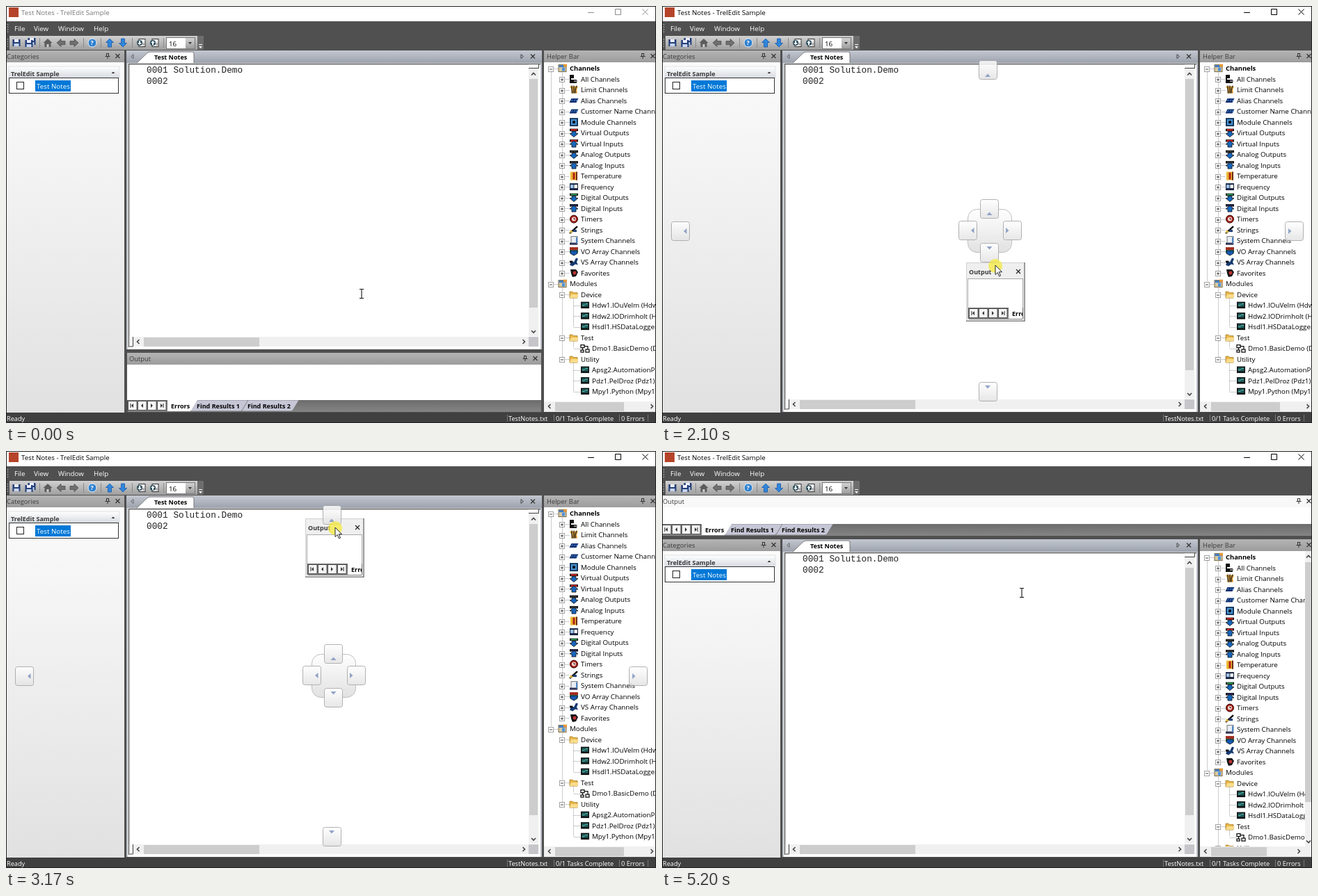
These frames come from a looping animation (934 px wide and 600 px high, 5460 ms). An HTML page:

```html
<!DOCTYPE html>
<html lang="en">
<head>
<meta charset="utf-8">
<title>Docking a panel</title>
<style>
html, body { margin: 0; width: 100%; height: 100%; overflow: hidden; background: #fff; }
#stage { display: block; font: 9.8px "Open Sans", "Noto Sans", sans-serif; }
text { white-space: pre; fill: #000; }
.b { font-size: 9px; font-weight: 700; }
.root { font-size: 9.4px; font-weight: 700; }
.soft { fill: #3a3a3a; }
.h { font-size: 9.4px; fill: #3c3c3c; }
.w { fill: #fff; }
.s { font-size: 9.2px; fill: #fff; }
.code { font: 12.8px "Liberation Mono", monospace; fill: #222; }
#title { fill: #777; }
#winbtn { stroke: #8c8c8c; }
.active #title { fill: #000; }
.active #winbtn { stroke: #000; }
#cap { fill: url(#gCap); }
.active #cap { fill: #f8f8f8; }
</style>
</head>
<body>
<svg id="stage" width="934" height="600" viewBox="0 0 934 600"></svg>
<script>
const stage = document.getElementById('stage');

// Drawing helpers
const R = (x, y, w, h, fill, more = '') => `<rect x="${x}" y="${y}" width="${w}" height="${h}" fill="${fill}" ${more}/>`;
const P = (d, fill, more = '') => `<path d="${d}" fill="${fill}" ${more}/>`;
const L = (d, color, w = 1, more = '') => `<path d="${d}" fill="none" stroke="${color}" stroke-width="${w}" ${more}/>`;
const T = (x, y, s, cls = '') => `<text x="${x}" y="${y}" class="${cls}">${s}</text>`;
const G = (x, y, body) => `<g transform="translate(${x} ${y})">${body}</g>`;
const clip = (x, y, w, h, body, vx = 0, vy = 0) =>
  `<svg x="${x}" y="${y}" width="${w}" height="${h}" viewBox="${vx} ${vy} ${w} ${h}">${body}</svg>`;
const turn = (x, y, dir, body) => `<g transform="translate(${x} ${y}) rotate(${dir * 90})">${body}</g>`;
const chev = (x, y, dir) => turn(x, y, dir, L('M-3 1.5L0-1.5 3 1.5', '#444', 1.6));
const tri = (x, y, dir) => turn(x, y, dir, P('M-4 2L0-2.5 4 2z', '#7d93bd'));
const cross = (x, y, r = 3, c = '#333') => L(`M${x - r} ${y - r}l${2 * r} ${2 * r}m0-${2 * r}l-${2 * r} ${2 * r}`, c, 1.2);
const pin = (x, y) => G(x, y, L('M-2-3.5h4m-3.5 0v4m3 0v-4m-5 4h7m-3.5 0v3.5', '#333'));
const grad = (id, a, b) => `<linearGradient id="${id}" x2="0" y2="1"><stop stop-color="${a}"/><stop offset="1" stop-color="${b}"/></linearGradient>`;

const defs = '<defs>' + grad('gCap', '#b4b4b4', '#9c9c9c') + grad('gStrip', '#c3c7d0', '#9ca2ad') +
  grad('gBar', '#d2d2d2', '#9e9e9e') + grad('gSide', '#fbfbfb', '#e1e1e1') + grad('gGroup', '#fff', '#d5d9df') +
  grad('gRow', '#6c6c6c', '#858585') + grad('gBtn', '#fff', '#e2e2e2') + grad('gHub', '#fff', '#dcdcdc') + '</defs>';

// Tree icons, centred on 0,0
const edge = 'stroke="#111" stroke-width=".8"';
const arrow = (c, up) => R(-6, -6, 12, 3.5, '#111') + R(-4.5, -5.3, 9, 2, c) +
  P(up ? 'M0-4l6 5h-3v4h-6v-4h-3z' : 'M-3-2h6v3h3L0 6l-6-5h3z', '#1766bd', edge);
const slab = P('M-6.5 3l3-6h10l-3 6z', '#0d2a6b') + L('M-3.5 1l2-3M0 1l2-3M3 1l2-3', '#4f9ae6');
const icons = {
  root: R(-6, -5, 11, 10, '#d9c9a0', 'stroke="#7b6a46"') + R(-5.5, -4.5, 10, 3, '#3d7cc6') + R(-1, -1, 4, 5, '#4f93dc') + P('M1-6h5v4h-5z', '#e59a3c'),
  all: P('M-6-6h6v5h-4v2h8v5h-10z', '#111') + R(0, 2, 5, 2, '#888'),
  limit: P('M-6-5h12l-2 5 1 5h-9l1-5z', '#dc9a28') + L('M-3-6v6l1 5M0-6v11M4-6l-2 6v5', '#222', 1.3),
  slab,
  module: R(-6, -6, 12, 12, '#123760') + R(-4, -4, 8, 8, '#4b97d4') + R(-2, -2, 4, 4, '#112'),
  vo: arrow('#d22', 0), vi: arrow('#d22', 1), ao: arrow('#333', 0), ai: arrow('#333', 1),
  dout: arrow('#2a9a50', 0), din: arrow('#225', 1),
  temp: R(-5, -6, 10, 12, '#e9b92f') + R(-1.5, -5, 3, 10, '#b3201a') + R(3, -6, 2, 12, '#6b2a10'),
  freq: R(-6, -5, 12, 10, '#17233f') + R(-5, -3, 4.5, 5, '#9cc4ee') + R(.5, -3, 4.5, 5, '#fff'),
  timer: '<circle r="5.5" fill="#a3201a" stroke="#300"/><circle r="3" fill="#f5dcd6"/>' + L('M0-2v2h2', '#300'),
  string: L('M-6 5L5-5', '#111', 2.5) + P('M-6 5l1-5 4 3z', '#e3b93a') + R(-1, 0, 5, 3, '#1c3c78'),
  system: R(-4, -6, 9, 11, '#e8eef5', 'stroke="#777"') + R(-6, 3, 11, 3, '#335') + R(3, -5, 2, 9, '#4e84c4'),
  voa: R(-6, -6, 12, 4, '#a32b20') + R(-6, -2, 12, 4, '#257a46') + P('M-5-1h10v4L0 6l-5-3z', '#1558b0', edge),
  vsa: P('M-6 4l3-6 3 2 3-6 3 1-2 5 2 4-4-1-4 3z', '#163a70') + R(-6, -2, 4, 3, '#111'),
  fav: P('M-5-5h8l3 4-3 6-5 1-2-5z', '#151515') + '<circle cx="1" r="2.5" fill="#b33"/>',
  folder: P('M-6-4h4l1.5 1.5H5V5H-6z', '#e9b84a', 'stroke="#a67a24" stroke-width=".8"') + P('M-4 0H6.5L5 5h-11z', '#f9dc8c'),
  device: R(-6, -5, 12, 9.5, '#111') + R(-4.5, -3.5, 9, 5.5, '#1f5a5c') + L('M-4 0h3l2-2h3', '#5fc2a8'),
  flow: L('M-6-5h5v4h-5zM1 1.5h5v4H1zM-6 2.5h4v3h-4zM-3.5-1v3.5M-1-3h5v4', '#111', 1.3)
};
const rows = [
  [0, 'Channels', 'root'], [1, 'All Channels', 'all'], [1, 'Limit Channels', 'limit'], [1, 'Alias Channels', 'slab'],
  [1, 'Customer Name Channels', 'slab'], [1, 'Module Channels', 'module'], [1, 'Virtual Outputs', 'vo'],
  [1, 'Virtual Inputs', 'vi'], [1, 'Analog Outputs', 'ao'], [1, 'Analog Inputs', 'ai'], [1, 'Temperature', 'temp'],
  [1, 'Frequency', 'freq'], [1, 'Digital Outputs', 'dout'], [1, 'Digital Inputs', 'din'], [1, 'Timers', 'timer'],
  [1, 'Strings', 'string'], [1, 'System Channels', 'system'], [1, 'VO Array Channels', 'voa'],
  [1, 'VS Array Channels', 'vsa'], [1, 'Favorites', 'fav'], [0, 'Modules', 'root'], [1, 'Device', 'folder'],
  [2, 'Hdw1.IOuVelm (Hdw1)', 'device'], [2, 'Hdw2.IODrimholt (Hdw2)', 'device'], [2, 'Hsdl1.HSDataLogger (Hsdl1)', 'device'],
  [1, 'Test', 'folder'], [2, 'Dmo1.BasicDemo (Dmo1)', 'flow'], [1, 'Utility', 'folder'],
  [2, 'Apsg2.AutomationProcess', 'device'], [2, 'Pdz1.PelDroz (Pdz1)', 'device'], [2, 'Mpy1.Python (Mpy1)', 'device']
];
const dots = d => L(d, '#999', 1, 'stroke-dasharray="1 1"');
const tree = R(773, 81, 161, 500, '#fff') +
  dots('M783.5 95V399M799.5 96V384M799.5 406V508M815.5 420V461M815.5 482V492M815.5 513V554') +
  rows.map(([lv, name, icon], i) => {
    const y = 89.6 + i * 15.5, x = 783 + lv * 16, by = Math.round(y) + .5;
    const open = icon === 'root' || icon === 'folder';
    const box = lv < 2 ? R(x - 3.5, by - 3, 7, 7, '#fff', 'stroke="#a0a0a0"') +
      L(`M${x - 2} ${by + .5}h4` + (open ? '' : 'm-2-2v4'), '#444') : '';
    return dots(`M${x + (lv < 2 ? 5 : 1)} ${by}h${lv < 2 ? 5 : 10}`) + box + G(x + 17, y, icons[icon]) +
      T(x + 27, y + 3.4, name, i ? '' : 'root');
  }).join('');

// Panels; d is the vertical shift caused by a panel docked above
const side = d => G(0, d,
  R(1, 64, 169, 17, 'url(#gCap)') + T(1, 76, 'Categories', 'h') + pin(146, 72) + cross(160.5, 72) +
  R(1, 81, 169, 504 - d, 'url(#gSide)') + R(4, 87, 159, 17, 'url(#gGroup)', 'stroke="#e2e2e2"') +
  T(7, 100.5, 'TrelEdit Sample', 'b soft') + P('M151.5 97l2.5-2.5 2.5 2.5z', '#333') +
  R(4.5, 103.5, 157, 22, '#fff', 'stroke="#333"') + R(15.5, 109.5, 10, 10, '#fff', 'stroke="#222"') +
  R(42, 107, 51, 16, '#0078d7') + T(44, 118.5, 'Test Notes', 'w'));

const strip = R(173, 64, 597, 18, 'url(#gStrip)') + L('M183 69.5v6l-3.5-3z', '#666') +
  P('M188 82L203 67.5q2-1.5 4-1.5h61q2 0 2 2V82z', '#fff') + L('M188 82L203 67.5q2-1.5 4-1.5h61q2 0 2 2V82', '#777') +
  T(213, 76.5, 'Test Notes', 'b') + L('M740 69.5v6l3.5-3z', '#444') + cross(757, 72.5);
const sheet = (top, bottom) => R(173, top, 597, bottom - top, '#bcc0c8') + R(175, top, 593, bottom - top, '#fff');

// b is the middle of the horizontal scroll bar
const doc = (d, b) => {
  const v = b - d;
  return G(0, d, sheet(82, v + 11) + strip +
    L(`M768 83.5H176.5V${v + 8}`, '#555', 1.4) +
    T(202, 95.5, '0001 Solution.Demo', 'code') + T(202, 111.5, '0002', 'code') +
    R(751, 84, 14, v - 92, '#f0f0f0') + R(751, 84, 14, 5, '#f4f4f4') + L('M751 89.5h14.5V84', '#444') +
    chev(758, 98, 0) + R(752, 105, 12, v - 154, '#cdcdcd') + chev(758, v - 14.5, 2) +
    R(177, v - 7, 574, 14, '#f0f0f0') + L(`M182.5 ${v - 7}v14h-5`, '#444') + chev(190, v, 3) +
    R(198, v - 6, 166, 13, '#cdcdcd') + chev(744, v, 1) + R(751, v - 7, 14, 14, '#c6c6ca'));
};

const helperCap = R(773, 64, 160, 17, 'url(#gCap)') + T(777, 76, 'Helper Bar', 'h') + pin(915, 72) + cross(929.5, 72);
const helperBars = narrow => R(773, 569, 160, 15, '#f0f0f0') + chev(781, 576, 3) +
  R(789, 570, narrow ? 80 : 99, 13, '#cdcdcd') + chev(narrow ? 915 : 928, 576, 1) +
  (narrow ? R(924, 144, 9, 425, '#f0f0f0') + chev(929, 152, 0) + R(924, 160, 9, 345, '#cdcdcd') + chev(929, 562, 2) : '');
const helper = d => G(0, d, helperCap) + clip(773, 81 + d, d ? 151 : 160, 488 - d, tree, 773, 81) + helperBars(d);

const tab = (a, b, x, s) => P(`M${a} 0H${b}l-9 15q-1 1-3 1H${a - 9}z`, '#c6c7d6', 'stroke="#666" stroke-width=".7"') + T(x, 11.5, s, 'b');
const nav = [0, 1, 2, 3].map(i => {
  const left = i < 2, x = 6.5 + 14 * i;
  const bar = i % 3 ? '' : L(`M${x + (left ? -2.5 : 2.5)} 5v6`, '#222');
  return R(14 * i + .5, 1.5, 12.5, 13, '#f6f6f6', 'stroke="#555"') + turn(x, 8, left ? 3 : 1, P('M-3 1.5L0-1.5 3 1.5z', '#333')) + bar;
}).join('');
const tabs = (x, y, w) => clip(x, y, w, 17, R(0, 0, w, 17, 'url(#gRow)') + nav +
  tab(172, 246, 172, 'Find Results 2') + tab(99, 173, 99, 'Find Results 1') +
  P('M57 0h43l-9 15q-1 1-3 1H57z', '#fff') + T(62, 11.5, 'Errors', 'b'));

const outLow = R(174, 499, 595, 17, 'none', 'id="cap"') + T(177, 510.5, 'Output', 'h') + pin(746, 507) + cross(760.5, 507) +
  R(174, 516, 595, 51, '#fff') + tabs(175, 567, 594);
const outTop = R(1, 64, 932, 17, '#f8f8f8') + T(1, 76, 'Output', 'h') + pin(915, 72) + cross(929.5, 72) +
  R(1, 81, 932, 25, '#fff') + tabs(0, 105, 933);

// Half-painted layout right after the drop
const halfDone = side(0) + sheet(82, 585) + strip + helperCap + R(1, 81, 932, 25, '#fff') + tabs(0, 105, 933) +
  side(63) + G(0, 63, strip) + L('M176.5 146V585', '#555') +
  R(752, 146, 12, 381, '#cdcdcd') + R(752, 527, 12, 23, '#f0f0f0') + R(751, 550, 13, 34, '#cdcdcd') +
  R(198, 566, 538, 13, '#f0f0f0') + R(198, 566, 166, 13, '#cdcdcd') +
  clip(773, 122, 160, 22, tree, 773, 122) + L('M773 143.5h160', '#aaa') +
  clip(773, 144, 151, 425, tree, 773, 81) + helperBars(1);

// Title bar, menu, toolbar, status bar
const sep = x => L(`M${x + .5} 46v14`, '#8a8a8a');
const disk = R(-5.5, -5, 11, 10, '#223f78') + R(-3, -5, 6, 4, '#eef') + R(-3.5, 1, 7, 4, '#c8d4ee');
const page = dir => R(-3, -5.5, 9, 11, '#f4f4f4', 'stroke="#333"') + L('M2 3h3M2 1h3', '#777') +
  '<circle cx="-2" r="4" fill="#2d4f5e"/>' + turn(-2, 0, dir, P('M0-3l3 3h-2v3h-2v-3h-2z', '#fff'));
const bigArrow = P('M0-6l5.5 5.5H2.5V6h-5V-.5h-3z', '#2f86dd', 'stroke="#185aa8" stroke-width=".8"');
const flat = P('M0-6l5.5 6H2.5V6h-5V0h-3z', '#6f6f6f', 'stroke="#4e4e4e" stroke-width=".8"');
const grip = y => L(`M2.5 ${y}v12`, '#aaa', 1.5, 'stroke-dasharray="1.5 2"');
const chrome = R(0, 0, 934, 600, '#505050') + R(1, 1, 932, 21, '#fff') + R(4, 2, 14, 14, '#b5442a') +
  '<text id="title" x="22" y="13">Test Notes - TrelEdit Sample</text>' +
  '<path id="winbtn" fill="none" d="M836 9.5h9M875.5 4.5h8v8h-8zM914.5 4.5l8 8m0-8l-8 8"/>' + grip(26) +
  [[12, 'File'], [40, 'View'], [75, 'Window'], [126, 'Help']].map(([x, s]) => T(x, 35.5, s, 'w')).join('') +
  P('M5 43H280q4 0 4 4V59q0 4-4 4H5z', 'url(#gBar)') + P('M275 43h5q4 0 4 4V59q0 4-4 4h-5z', '#6d6d6d') +
  L('M277 55.5h5', '#fff') + P('M277 58h5l-2.5 3z', '#fff') + grip(47) +
  G(15, 53, disk) + G(37, 51, disk) + G(33, 54, disk) + sep(48) +
  G(60, 53, P('M-6.5 0L0-6l6.5 6h-2v6h-9V0z', '#5c5c5c') + R(-1.5, 2, 3, 4, '#ccc')) +
  turn(79, 53, 3, flat) + turn(98, 53, 1, flat) + sep(111) +
  G(124, 53, '<circle r="6" fill="#2f80cf" stroke="#e8f2fb"/>' + T(-2.4, 3.4, '?', 'b w')) + sep(136) +
  G(149, 53, bigArrow) + turn(168, 53, 2, bigArrow) + sep(181) + G(194, 53, page(2)) + G(213, 53, page(0)) + sep(226) +
  R(230.5, 45.5, 41, 16, '#fff', 'stroke="#777"') + T(234, 57.5, '16') + R(258, 46, 13, 15, 'url(#gBar)') + P('M262 52h5l-2.5 3z', '#333') +
  R(0, 585, 934, 15, '#404040') + T(1, 597, 'Ready', 's') + T(722, 597, 'TestNotes.txt', 's') + T(790, 597, '0/1 Tasks Complete', 's') +
  T(884, 597, '0 Errors', 's') + L('M720.5 588v10M787.5 588v10M881.5 588v10M922.5 588v10', '#777');

// Floating panel and docking guides
const floating = R(0, 0, 85, 85, '#efefef') + L('M.5 85V.5H85', '#d0d0d0') + L('M84 0V84.3H0', '#858585', 1.6) +
  T(4, 16.5, 'Output', 'b soft') + cross(75, 13, 3, '#222') + R(2.5, 23.5, 79, 57, '#fff', 'stroke="#aaa"') +
  R(3, 65, 79, 16, '#707070') + tabs(4, 65, 77);
const guide = (x, y, ax, ay, dir) => R(x + .5, y + .5, 26, 27, 'url(#gBtn)', 'rx="3" stroke="#a2a2a2"') + tri(ax, ay, dir);
const guides = '<g opacity=".84">' + guide(13, 310, 33.5, 324, 3) + guide(895, 310, 902, 324, 1) +
  guide(455, 78, 468, 100, 0) + guide(455, 541, 468, 548, 2) +
  R(439.5, 292.5, 63, 62, 'url(#gHub)', 'rx="13" stroke="#b0b0b0"') +
  guide(457, 278, 470.5, 299, 0) + guide(457, 341, 470.5, 348, 2) + guide(426, 309, 446.5, 323, 3) + guide(490, 309, 496, 323, 1) + '</g>';

const layer = (id, body) => `<g id="${id}">${body}</g>`;
stage.innerHTML = defs + chrome +
  layer('low', side(0) + doc(0, 483) + helper(0) + outLow) +
  layer('drag', side(0) + doc(0, 573) + helper(0)) +
  layer('half', halfDone) +
  layer('top', outTop + side(63) + doc(63, 573) + helper(63)) +
  '<rect id="preview" fill="#99b4d1" opacity=".4"/>' + layer('panel', floating) + layer('guides', guides) +
  layer('press', '<circle r="10" cy="1" fill="#f4e93c" opacity=".75"/>') +
  layer('arrow', P('M0 0V13.5L3.2 10.5 5.4 15.8 7.5 15 5.3 9.7H9.5z', '#fff', 'stroke="#111" stroke-width=".9"')) +
  layer('beam', L('M-3-6.5h2.5L0-6l.5-.5H3M0-6V6M-3 6.5h2.5L0 6l.5.5H3', '#111', 1.1)) +
  R(.5, .5, 933, 599, 'none', 'stroke="#222"');

const LOOP = 5460;
const runs = [[200, 740, 9], [870, 940, 2], [1140, 1140, 1], [1340, 1830, 8], [1900, 2430, 9], [2490, 3030, 9],
  [3100, 3370, 5], [3700, 3780, 2], [4040, 4580, 9], [4650, 4790, 3], [5050, 5200, 3]];
const ticks = [0, ...runs.flatMap(([a, b, n]) =>
  Array.from({ length: n }, (_, i) => Math.round((a + (b - a) * i / Math.max(1, n - 1)) / 10) * 10))];

const pointer = [[130, 511, 414], [740, 478, 512], [870, 478, 509], [940, 475, 507], [1270, 475, 507], [1620, 473, 487],
  [1830, 475, 452], [2100, 479, 373], [2170, 480, 345], [2300, 483, 279], [2360, 484, 242], [2430, 486, 215],
  [2560, 486, 196], [3030, 476, 130], [3170, 473, 110], [3370, 473, 101], [3970, 473, 101], [4580, 515, 188],
  [4790, 515, 196], [4980, 515, 196], [5200, 517, 204]];
const panelPath = [[1270, 432, 494], [1620, 430, 474], [1830, 432, 447], [2100, 437, 369], [2360, 440, 240],
  [2430, 442, 214], [2560, 443, 193], [3030, 433, 117], [3170, 430, 97], [3370, 430, 88]];
const previews = [[2170, 2230, 173, 499, 597, 86], [2300, 2360, 173, 64, 597, 86], [3230, 3700, 1, 64, 932, 63]];

function at(path, t) {
  const i = path.findIndex(k => k[0] > t);
  if (i < 0) return path.at(-1).slice(1);
  if (!i) return path[0].slice(1);
  const [t0, x0, y0] = path[i - 1], [t1, x1, y1] = path[i], k = (t - t0) / (t1 - t0);
  return [Math.round(x0 + (x1 - x0) * k), Math.round(y0 + (y1 - y0) * k)];
}
const el = id => document.getElementById(id);
const show = (id, on) => el(id).style.display = on ? '' : 'none';
const move = (id, [x, y]) => el(id).setAttribute('transform', `translate(${x} ${y})`);

function draw(now) {
  const clock = now % LOOP;
  const t = ticks.findLast(k => k <= clock);
  const dragging = t >= 1340 && t < 3700;
  show('low', t < 1340);
  show('drag', dragging);
  show('half', t >= 3700 && t < 3780);
  show('top', t >= 3780);
  show('panel', dragging);
  show('guides', dragging);
  show('press', t >= 1140 && t < 3700);
  show('arrow', t >= 940 && t < 3700);
  show('beam', t < 940 || t >= 3700);
  stage.classList.toggle('active', t >= 1140);

  const zone = previews.find(([a, b]) => t >= a && t < b);
  show('preview', zone);
  if (zone) ['x', 'y', 'width', 'height'].forEach((k, i) => el('preview').setAttribute(k, zone[i + 2]));

  const pos = at(pointer, t);
  ['press', 'arrow', 'beam'].forEach(id => move(id, pos));
  move('panel', at(panelPath, t));
  requestAnimationFrame(() => draw(performance.now()));
}
draw(performance.now());
</script>
</body>
</html>
```
